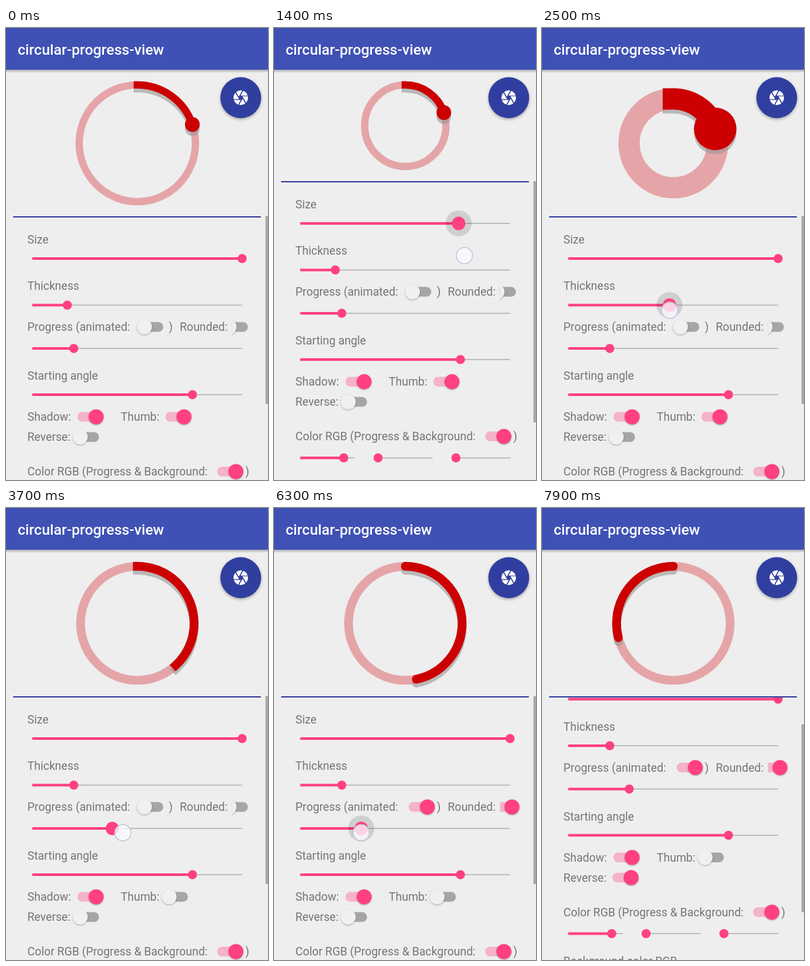
An HTML page that plays this animation: 404 px wide and 694 px high, repeating every 8000 ms.

```html
<!DOCTYPE html>
<html lang="en">
<head>
<meta charset="utf-8">
<title>circular-progress-view</title>
<style>
  html, body { margin: 0; width: 100%; height: 100%; overflow: hidden; background: #eee; }
  svg { display: block; }
  text { font: 17.6px Roboto, sans-serif; fill: #757575; }
  .title { font-size: 22.6px; font-weight: 500; fill: #fff; }
  .knob { filter: drop-shadow(0 1px 1px rgba(0, 0, 0, .3)); }
  .fab { filter: drop-shadow(0 2px 2px rgba(0, 0, 0, .3)); }
  .cast { filter: drop-shadow(0 6px 0 rgba(150, 150, 150, .6)); }
</style>
</head>
<body>
<svg width="404" height="694" viewBox="0 0 404 694">
  <defs>
    <linearGradient id="fade" x2="0" y2="1">
      <stop stop-opacity=".28"/><stop offset="1" stop-opacity="0"/>
    </linearGradient>
    <clipPath id="cut"><rect x="348" y="430" width="56" height="56"/></clipPath>
  </defs>
  <g id="panel"></g>
  <rect id="cover" width="404" fill="#eee"/>
  <rect id="rule" x="11" width="382" height="2" fill="#36419b"/>
  <rect id="bar" x="400" width="4" fill="#a9a9a9"/>
  <circle id="track" cx="202.5" fill="none" stroke="#e5a5a8"/>
  <g class="cast">
    <circle id="arc" fill="none" stroke="#c00" pathLength="360"/>
    <circle id="dot" fill="#c00"/>
  </g>
  <rect width="404" height="64" fill="#3f51b5"/>
  <rect y="64" width="404" height="5" fill="url(#fade)"/>
  <text class="title" x="18" y="41">circular-progress-view</text>
  <circle class="fab" cx="362" cy="107" r="31.5" fill="#303f9f"/>
  <path transform="translate(348.5 93.6) scale(1.12)" fill="#fff" d="M9.4 10.5l4.77-8.26C13.47 2.09 12.75 2 12 2c-2.4 0-4.6.85-6.32 2.25l3.66 6.35zM21.54 9c-.92-2.92-3.15-5.26-6-6.34L11.88 9zM21.8 10h-7.49l5.05 8.75C21 16.97 22 14.61 22 12c0-.69-.07-1.35-.2-2zM8.54 12l-3.9-6.75C3.01 7.03 2 9.39 2 12c0 .69.07 1.35.2 2h7.49zM2.46 15c.92 2.92 3.15 5.26 6 6.34L12.12 15zM13.73 15l-3.9 6.76c.7.15 1.42.24 2.17.24 2.4 0 4.6-.85 6.32-2.25l-3.66-6.35z"/>
  <circle id="finger" r="12.5" fill="#fbfbff" fill-opacity=".78" stroke="#c3c5de" stroke-width="1.5"/>
</svg>
<script>
const LOOP = 8000, PINK = '#ff4081', LEFT = 40, SPAN = 323.5, EDGE = 290, CONTENT = 566;
const $ = id => document.getElementById(id);
const set = (node, attrs) => {
  for (const key in attrs) node.setAttribute(key, attrs[key]);
  return node;
};
const add = (parent, tag, attrs) =>
  parent.appendChild(set(document.createElementNS('http://www.w3.org/2000/svg', tag), attrs));
const clamp = v => Math.max(0, Math.min(1, v));

// Piecewise linear motion through [time, value] points
const path = (...points) => t => {
  const i = points.findIndex(p => p[0] > t);
  if (i === 0) return points[0][1];
  if (i < 0) return points[points.length - 1][1];
  const [t0, a] = points[i - 1], [t1, b] = points[i];
  return a + (b - a) * (t - t0) / (t1 - t0);
};
const press = (t, from, to) => Math.min(clamp((t - from) / 150), clamp((to + 150 - t) / 150));

const panel = $('panel');
const label = (x, y, words) => { add(panel, 'text', { x, y: y + 6 }).textContent = words; };

function slider(y, x, from = LEFT, to = LEFT + SPAN) {
  add(panel, 'rect', { x: from, y: y - .7, width: to - from, height: 1.4, fill: '#adadad' });
  const line = add(panel, 'rect', { x: from, y: y - 2, height: 4, fill: PINK });
  const halo = add(panel, 'circle', { cy: y, r: 20 });
  const knob = add(panel, 'circle', { cy: y, fill: PINK });
  // The knob grows first, then the halo appears
  const move = (x, p = 0) => {
    set(line, { width: x - from });
    set(halo, { cx: x, opacity: clamp(2 * p - 1) * .13 });
    set(knob, { cx: x, r: 7 + 3.5 * clamp(2 * p) });
  };
  move(x);
  return move;
}

// A switch that flips once at time `at`, or never
function toggle(x, y, on, at = Infinity, clip) {
  const g = add(panel, 'g', clip ? { 'clip-path': clip } : {});
  const track = add(g, 'rect', { x: x - 17.5, y: y - 7.5, width: 35, height: 15, rx: 7.5 });
  const halo = add(g, 'circle', { cy: y, r: 20 });
  const knob = add(g, 'circle', { class: 'knob', cy: y, r: 11.5 });
  return t => {
    const lit = on !== (t >= at), slide = clamp((t - at) / 250);
    const cx = x + 11.5 * (on ? 1 - 2 * slide : 2 * slide - 1);
    set(track, { fill: lit ? '#f4b3c9' : '#a5a5a5' });
    set(halo, { cx, opacity: press(t, at - 100, at + 150) * .06 });
    set(knob, { cx, fill: lit ? PINK : '#f0f0f0' });
  };
}

const THUMB_OFF = 3350, ROUND_ON = 4750, ANIM_ON = 5110, REVERSE_ON = 7500;

const sizeX = path([200, 363.5], [900, 180], [1400, 284], [1800, 363.5]);
const thickX = path([1950, 94], [2150, 62], [2500, 196], [2600, 197], [2900, 70], [3100, 104]);
const progX = path([3600, 104], [3650, 147], [3700, 163], [4050, 290], [4500, 137],
  [5600, 137], [5900, 250], [6300, 134]);
const scrollY = path([6950, 0], [7100, 24], [7350, 60.5]);

label(32.5, 324, 'Size');
const size = slider(353.5, 363.5);
label(32.5, 395.5, 'Thickness');
const thick = slider(425, 94);
label(32.5, 458.5, 'Progress (animated:');
label(250.5, 458.5, ')');
label(267.5, 458.5, 'Rounded:');
const prog = slider(491.5, 104);
label(32.5, 533.5, 'Starting angle');
slider(562.5, 287);
label(32.5, 596.5, 'Shadow:');
label(176.5, 596.5, 'Thumb:');
label(32.5, 627.5, 'Reverse:');
label(32.5, 680.5, 'Color RGB (Progress & Background:');
label(368.5, 680.5, ')');
label(32.5, 755.5, 'Background color RGB');
for (const [y, red] of [[713.5, 107], [787.5, 40]])
  [red, 160, 280].forEach((x, i) => slider(y, x, LEFT + 120 * i, LEFT + 120 * i + 84));

const toggles = [
  toggle(224.5, 458.5, false, ANIM_ON),
  toggle(355, 458.5, false, ROUND_ON, 'url(#cut)'),
  toggle(127, 596.5, true),
  toggle(262.5, 596.5, true, THUMB_OFF),
  toggle(125.5, 627.5, false, REVERSE_ON),
  toggle(342.5, 680.5, true),
];

// Touches: from, to, x(t), y(t); a dragging finger runs slightly ahead
const ahead = f => t => f(t + 45);
const touches = [
  [150, 1850, ahead(sizeX), () => 349],
  [1920, 3130, ahead(thickX), () => 433],
  [THUMB_OFF - 100, THUMB_OFF, () => 262, () => 598],
  [3600, 4530, ahead(progX), () => 498],
  [ROUND_ON - 100, ROUND_ON, () => 362, () => 460],
  [ANIM_ON - 100, ANIM_ON, () => 225, () => 460],
  [5560, 6330, ahead(progX), () => 498],
  [6900, 7370, () => 356, t => 521 - scrollY(t)],
  [REVERSE_ON - 100, REVERSE_ON, () => 126, () => 568],
];

function draw(t) {
  const scale = (sizeX(t) - LEFT) / SPAN;
  const width = 68 * (thickX(t) - LEFT) / SPAN;
  const sweep = 360 * (progX(t > 5500 ? t - 200 : t) - LEFT) / SPAN;
  const lift = 220 * (1 - scale), scroll = scrollY(t);
  const edge = EDGE - lift, view = 694 - edge;

  size(sizeX(t), press(t, 150, 1850));
  thick(thickX(t), press(t, 1920, 3130));
  prog(progX(t), Math.max(press(t, 3630, 4530), press(t, 5560, 6330)));
  toggles.forEach(update => update(t));

  set(panel, { transform: `translate(.5 ${.5 - lift - scroll})` });
  set($('cover'), { height: edge });
  set($('rule'), { y: edge - 1 });
  set($('bar'), { y: edge - 1 + scroll * view / CONTENT, height: view * view / CONTENT });

  const cx = 202.5, cy = 67 + 110 * scale, r = 110 * scale - 9 - width;
  const turn = sweep * Math.PI / 180;
  set($('track'), { cy, r, 'stroke-width': width });
  set($('arc'), {
    r, 'stroke-width': width,
    'stroke-dasharray': `${sweep} 720`,
    'stroke-linecap': t >= ROUND_ON ? 'round' : 'square',
    transform: `translate(${cx} ${cy}) scale(${t >= REVERSE_ON ? -1 : 1} 1) rotate(-90)`,
  });
  set($('dot'), {
    cx: cx + r * Math.sin(turn), cy: cy - r * Math.cos(turn),
    r: t < THUMB_OFF ? width : 0,
  });

  const touch = touches.find(([from, to]) => t >= from && t < to);
  set($('finger'), touch
    ? { cx: touch[2](t) + .5, cy: touch[3](t) + .5, visibility: 'visible' }
    : { visibility: 'hidden' });
}

function tick() {
  draw(performance.now() % LOOP);
  requestAnimationFrame(tick);
}
tick();
</script>
</body>
</html>
```
